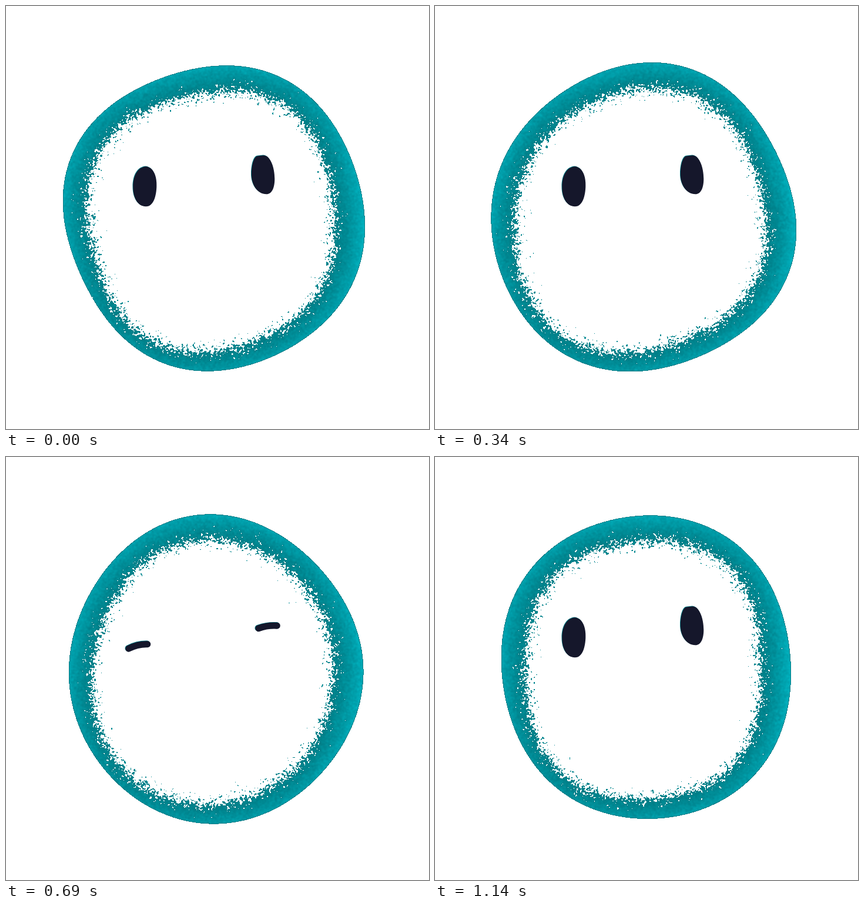
An HTML page with a canvas for the animation above (1.18 s loop, 720 by 720 pixels).

```html
<!DOCTYPE html>
<html lang="en">
<head>
<meta charset="utf-8">
<title>Wobbling blob</title>
<style>
  html, body { margin: 0; width: 100%; height: 100%; overflow: hidden; background: #fff; }
  canvas { display: block; width: 100%; height: 100%; }
</style>
</head>
<body>
<canvas id="stage" width="720" height="720"></canvas>
<script>
const SIZE = 720, COUNT = SIZE * SIZE, LOOP = 1180, STEPS = 34;
const CX = 356, CY = 360, TAU = Math.PI * 2, BINS = 2048;
const ctx = document.getElementById('stage').getContext('2d');
const image = ctx.createImageData(SIZE, SIZE);
const pixels = new Uint32Array(image.data.buffer);

// The outline is a circle bent by four waves: shift, oval, triangle, square.
// Each pose holds its radius, then a cosine and sine part per wave.
const poses = [
  { at: 0, shape: [258, -0.6, -0.7, -1.8, 1.5, -0.9, -2.3, 0, 5] },
  { at: 6, shape: [256, -5.6, 1.4, -1.6, -1.2, 1.4, 1.5, -0.5, 4] },
  { at: 10, shape: [260, -2.1, 2.2, -1.5, -2.2, 0.9, 3.4, 1, 4] },
  { at: 17, shape: [255, 2.1, 5.1, -4.8, 0.2, 4.8, 2.1, 2.9, -1.5] },
  { at: 23, shape: [254.5, -2.9, -0.3, -8, 1.7, -0.6, 0.6, 2, 0.4] },
  { at: 27, shape: [254, -0.2, -2.7, -3.7, 0.1, 0.2, 0.9, 1.6, 0.6] },
  { at: 33, shape: [255, 4.5, -2.6, -5.9, 1.8, -1, -0.3, -2.6, 1.5] }
];

function shapeAt(step) {
  let k = poses.length - 1;
  while (poses[k].at > step) k--;
  const a = poses[k], b = poses[(k + 1) % poses.length];
  const t = (step - a.at) / ((b.at || STEPS) - a.at);
  return a.shape.map((v, i) => v + (b.shape[i] - v) * t);
}

function radiusAt(shape, a) {
  let r = shape[0];
  for (let n = 1; n <= 4; n++) {
    r += shape[2 * n - 1] * Math.cos(n * a) + shape[2 * n] * Math.sin(n * a);
  }
  return r;
}

// The rim is widest at the upper right and leaves a squarish hole.
const rimAt = a => 39.5 + 7.5 * Math.cos(a + TAU / 8)
  + 5 * Math.cos(2 * a - TAU / 8) + 3.5 * Math.cos(4 * a);

let seed = 20117;
function random() {
  seed = (Math.imul(seed, 1664525) + 1013904223) >>> 0;
  return seed / 4294967296;
}

function blur(src) {
  const smooth = (a, gap) => a.map((v, i) =>
    (a[(i + COUNT - gap) % COUNT] + 2 * v + a[(i + gap) % COUNT]) / 4);
  return smooth(smooth(src, 1), SIZE);
}

// Scales zero-mean noise to unit deviation.
function normalise(a) {
  let sum = 0;
  for (const v of a) sum += v * v;
  const k = 1 / Math.sqrt(sum / a.length);
  return a.map(v => v * k);
}

const soft = blur(new Float32Array(COUNT).map(() => random() - 0.5));
const softer = blur(soft);
const mottle = normalise(blur(softer));
// Long tails throw single specks far from the edge.
const grain = normalise(soft.map((v, i) => v + softer[i]))
  .map(g => g * (5 + 1.4 * Math.abs(g)));

const radius = new Float32Array(COUNT);
const angle = new Uint16Array(COUNT);
for (let i = 0; i < COUNT; i++) {
  const x = i % SIZE + 0.5 - CX, y = Math.floor(i / SIZE) + 0.5 - CY;
  radius[i] = Math.hypot(x, y);
  angle[i] = Math.floor((Math.atan2(y, x) / TAU + 1) * BINS) % BINS;
}

const WHITE = 0xffffffff, EDGE = 0xff857b08;
const outer = new Float32Array(BINS), inner = new Float32Array(BINS);

function drawBody(step) {
  const shape = shapeAt(step), shift = step * 76543;
  for (let i = 0; i < BINS; i++) {
    const a = i / BINS * TAU;
    outer[i] = radiusAt(shape, a);
    inner[i] = outer[i] - rimAt(a);
  }
  for (let i = 0; i < COUNT; i++) {
    const k = angle[i], gap = outer[k] - radius[i], depth = radius[i] - inner[k];
    const j = (i + shift) % COUNT;
    if (gap < 0 || depth + grain[j] < 0) {
      pixels[i] = WHITE;
    } else if (gap < 1) {
      pixels[i] = EDGE;
    } else {
      const t = Math.min(1, Math.max(0, depth / 58)) ** 1.2;
      const m = 4 * mottle[j];
      const g = 124 + 58 * t + m, b = 133 + 63 * t + m;
      pixels[i] = (255 << 24 | b << 16 | g << 8) >>> 0;
    }
  }
  ctx.putImageData(image, 0, 0);
}

const eyes = {
  open: new Path2D('M238 273C250 274 257 288 256 308C255 328 249 341 238 341C224 341 216 326 216 308C216 288 224 274 238 273Z' +
    'M438 254C450 254 457 275 457 294C457 310 452 320 443 320C428 320 417 304 417.5 285C418 268 422 255 429 255Z'),
  squint: new Path2D('M203 309L247 321L208 335M463 272L419 293L462 300'),
  flat: new Path2D('M208.5 326Q224 318 240.5 318.5M429.5 291.5Q445 286 461 287')
};

function drawEyes(step) {
  const mood = step < 20 || step > 28 ? 'open'
    : step > 20 && step < 26 ? 'squint' : 'flat';
  const paint = (color, dx, dy) => {
    ctx.save();
    ctx.translate(dx, dy);
    ctx.fillStyle = ctx.strokeStyle = color;
    ctx.lineWidth = 11;
    ctx.lineCap = ctx.lineJoin = 'round';
    if (mood === 'open') ctx.fill(eyes.open);
    else ctx.stroke(eyes[mood]);
    ctx.restore();
  };
  paint('#087b85', -0.5, -0.4);
  paint('#15172b', 0.3, 0.2);
}

let shown = -1;
function tick() {
  const t = performance.now() % LOOP / LOOP;
  const step = Math.min(STEPS - 1, Math.floor(t * STEPS + 0.25));
  if (step !== shown) {
    shown = step;
    drawBody(step);
    drawEyes(step);
  }
  requestAnimationFrame(tick);
}
tick();
</script>
</body>
</html>
```
